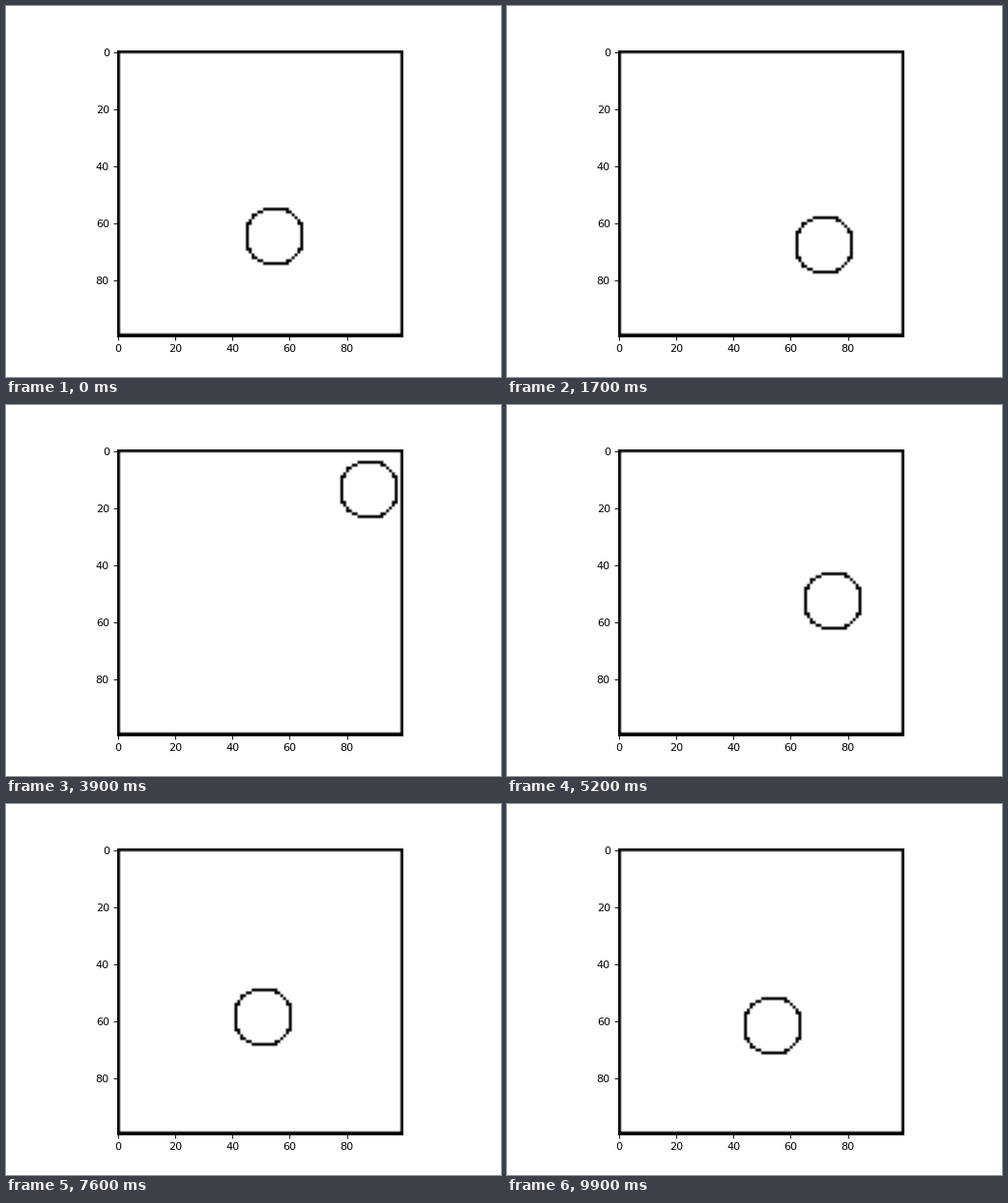
A matplotlib script that plays this animation: 512x384 px, repeating every 10000 ms.

```python
import numpy as np
import matplotlib.pyplot as plt
from matplotlib.animation import FuncAnimation

SIZE = 100
RADIUS = 10
FRAMES = 100
LEAD = 5                 # steps already travelled when the loop begins
SPEED_X = 1 - 1e-9       # a hair under one cell per step
SPEED_Y = 3

theta = np.linspace(0, 2 * np.pi, 100)
ring_x = RADIUS * np.cos(theta)
ring_y = RADIUS * np.sin(theta)


def position(frame):
    """Ball centre, bouncing off the right wall, floor and ceiling."""
    step = (frame + LEAD - 1) % FRAMES + 1
    x = 50 + SPEED_X * (41 - abs(step - 41))
    y = 8 + SPEED_Y * abs((step - 14) % 56 - 28)
    return x, y


def cells(frame):
    grid = np.full((SIZE, SIZE), 255, dtype=np.uint8)
    grid[[0, -1], :] = 0
    grid[:, [0, -1]] = 0
    x, y = position(frame)
    cols = np.floor(x + ring_x).astype(int)
    rows = np.floor(y + ring_y + 1e-9).astype(int)
    inside = (cols >= 0) & (cols < SIZE) & (rows >= 0) & (rows < SIZE)
    grid[rows[inside], cols[inside]] = 0
    return grid


fig, ax = plt.subplots(figsize=(6.4, 4.8), dpi=80)
image = ax.imshow(cells(0), cmap="gray", vmin=0, vmax=255)


def update(frame):
    image.set_data(cells(frame))
    return (image,)


anim = FuncAnimation(fig, update, frames=FRAMES, interval=100,
                     repeat=True, repeat_delay=0, blit=False)
plt.show()
```
